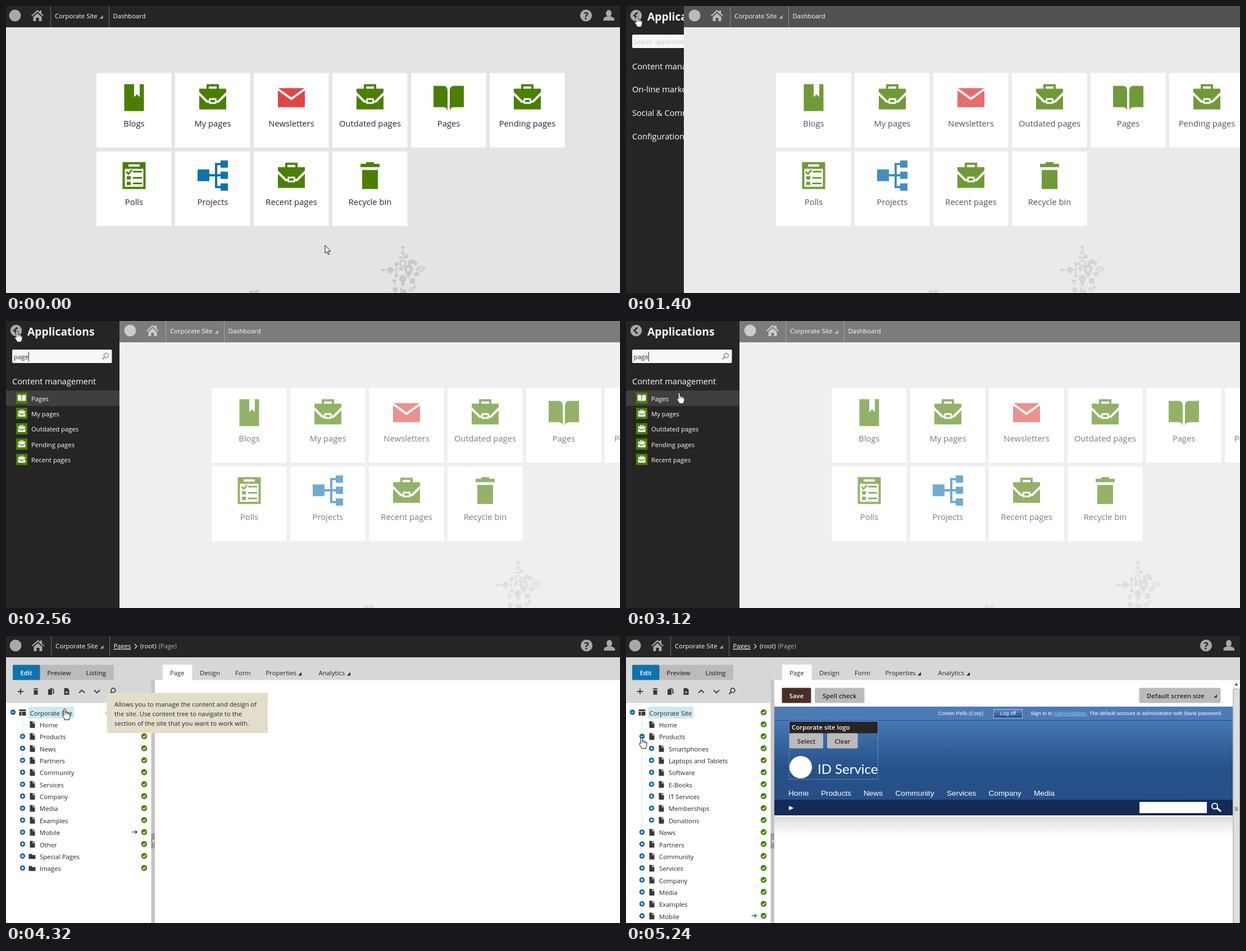
Recreate the animation shown at these times as an HTML page. Size 1093 px wide and 512 px high, loop 5960 ms.

```html
<!DOCTYPE html>
<html lang="en">
<head>
<meta charset="utf-8">
<title>Dashboard</title>
<style>
html, body { margin: 0; width: 100%; height: 100%; overflow: hidden; background: #fff; }
svg { display: block; width: 100vw; height: 100vh; }
text { font-family: "Open Sans", "Noto Sans", sans-serif; white-space: pre; }
.arial { font-family: "Liberation Sans", Arial, sans-serif; }
.lato { font-family: Lato, sans-serif; }
</style>
</head>
<body>
<svg id="stage" viewBox="0 0 1093 512" preserveAspectRatio="none"></svg>
<script>
const LOOP = 5960, STEP = 40, SHIFT = 205, EDGE = 3;
const DARK = '#262524', GREEN = '#4a7f04', BLUE = '#1072ae', RED = '#e14545', GREY = '#a9a9a9', BUTTON = '#bdbabb', INK = '#3a3939';
const ROW = 21.35, UI = 11.3;

// drawing helpers
const rect = (x, y, w, h, fill, extra = '') => `<rect x="${x}" y="${y}" width="${w}" height="${h}" fill="${fill}" ${extra}/>`;
const path = (d, fill, extra = '') => `<path d="${d}" fill="${fill}" ${extra}/>`;
const line = (d, color, width = 1, extra = '') => path(d, 'none', `stroke="${color}" stroke-width="${width}" ${extra}`);
const disc = (x, y, r, fill, extra = '') => `<circle cx="${x}" cy="${y}" r="${r}" fill="${fill}" ${extra}/>`;
const text = (x, y, s, size = UI, fill = DARK, extra = '') => `<text x="${x}" y="${y}" font-size="${size}" fill="${fill}" ${extra}>${s}</text>`;
const mid = 'text-anchor="middle"', bold = 'font-weight="600"';
const at = (x, y, body, scale = 1) => `<g transform="translate(${x} ${y}) scale(${scale})">${body}</g>`;
const group = (id, body, extra = '') => `<g id="${id}" ${extra}>${body}</g>`;
const corner = (x, y, fill, s = 6) => path(`M${x} ${y}h${-s}l${s} ${-s}z`, fill);
const lens = (x, y, r, color, w) => disc(x, y, r, 'none', `stroke="${color}" stroke-width="${w}"`) +
  line(`M${x - r * .7} ${y + r * .7}l${-r} ${r}`, color, w * 1.3);

// application icons, centred on 0,0
const icons = {
  briefcase: (c, bg) => rect(-24, -14, 48, 37, c) + line('M-9 -13V-20H9V-13', c, 4) +
    line('M-25 -6L-10 9H10L25 -6', bg, 4) + rect(-6.5, 3, 13, 10, bg) + rect(-4, 6, 8, 4, c),
  book: (c, bg) => rect(-17.5, -22, 35, 48, c) + path('M0 -22H10V1L5 -4L0 1z', bg),
  pages: c => [1, -1].map(s => `<g transform="scale(${s} 1)">` +
    path('M27 -19H8Q2 -18 2 -11V26Q3 19 9 19H27z', c) + '</g>').join(''),
  mail: (c, bg) => rect(-24, -15, 48, 34, c) + line('M-25 -14L0 4L25 -14', bg, 4),
  polls: (c, bg) => rect(-20.5, -23, 41, 48, c) + rect(-10, -19, 20, 4, bg) + rect(-16.5, -11, 33, 32, bg) +
    line('M-14 -6l4 4l6 -7', c, 3) + line('M-2 -6H14M-2 5H14M-2 15H14', c, 3) + rect(-13, 2, 7, 6, c) + rect(-13, 12, 7, 6, c),
  tree: c => rect(-27, -10, 21, 21, c) + [-26, -6, 15].map(y => rect(14, y, 13, 13, c)).join('') +
    line('M-6 .5H14M14 -19.5H6V21.5H14', c, 4),
  bin: c => rect(-17, -20, 34, 6, c) + rect(-7, -23, 14, 4, c) + rect(-14, -9, 28, 34, c),
};

const tiles = [
  ['Blogs', 'book'], ['My pages', 'briefcase'], ['Newsletters', 'mail', RED], ['Outdated pages', 'briefcase'],
  ['Pages', 'pages'], ['Pending pages', 'briefcase'], ['Polls', 'polls'], ['Projects', 'tree', BLUE],
  ['Recent pages', 'briefcase'], ['Recycle bin', 'bin'],
];

function clusterArt() {
  const c = '#c9c9c9', bg = '#e4e4e4';
  return line('M706.5 429V442M703 432l3.5 -4l3.5 4M703 439l3.5 4l3.5 -4', c, 2) +
    line('M669 471H696M695 460V483M699 449H712', c, 2) + path('M677 471l7 -7l7 7l-7 7z', c) + disc(670, 471, 2.5, c) +
    rect(692, 457, 6, 6, c) + rect(692, 479, 6, 5, c) + disc(712, 447, 3.5, c) + disc(703, 449, 2, c) +
    disc(706, 459, 5, 'none', `stroke="${c}" stroke-width="3"`) + disc(703, 469, 3.5, c) +
    disc(719, 458, 4, c) + disc(724, 456, 4, c) + disc(729, 459, 3.5, c) +
    path('M716.500 486L709 472A8 8 0 1 1 724 472z', c) + disc(716.5, 470, 3, bg) +
    path('M730 469Q738 458 747 469Q738 480 730 469z', c) + disc(738.5, 469, 4, bg) + disc(738.5, 469, 2, c) +
    path('M731 472l2 4h5l-4 3l1 5l-4 -3l-4 3l1 -5l-4 -3h5z', c) +
    disc(706.5, 486, 6.5, c) + rect(703.5, 491, 6, 8, c) + path('M686 488h11l-4 5v5l-3 -2v-3z', c) +
    path('M719 486h9v11l-2 -2h-7z', c) + disc(721, 506, 3, 'none', `stroke="${c}" stroke-width="2"`) +
    disc(727, 501.5, 2, 'none', `stroke="${c}" stroke-width="2"`) + disc(693, 506, 4.5, c) + rect(691, 509, 4, 4, c) +
    path('M702 513V502h3v5l4 -3v3l4 -3v9z', c) +
    disc(443, 521, 12, c) + disc(443, 521, 13, 'none', `stroke="${c}" stroke-width="5" stroke-dasharray="6 4.200"`);
}

function dashboard() {
  return rect(-10, 38, 1120, 474, '#e4e4e4') + clusterArt() + tiles.map(([name, icon, color = GREEN], i) => {
    const x = 161 + i % 6 * 140, y = 119.5 + (i > 5) * 140;
    return rect(x, y, 133.5, 133, '#fff') + at(x + 67, y + 42, icons[icon](color, '#fff')) +
      text(x + 67, y + 95.5, name, 14.75, DARK, mid);
  }).join('');
}

function header() {
  return rect(-10, 0, 1120, 38, DARK) + disc(16, 17, 10.5, GREY) +
    path('M45 17L56 7L60 10.600V8H63V13.400L67 17L65.500 18.500L56 10L46.500 18.500zM48.500 19.500L56 12.800L63.500 19.500V27H58.500V21H53.500V27H48.500z', GREY) +
    line('M79.500 0V37M183.500 0V37', '#6c6b6a') + text(87, 22, 'Corporate Site', UI, '#fff') + corner(172.5, 22.5, GREY) +
    group('crumbHome', text(190.5, 22, 'Dashboard', UI, '#fff')) +
    group('crumbPage', text(190.5, 22, 'Pages', UI, '#fff', 'text-decoration="underline"') +
      line('M228 14.500l4 4l-4 4', '#ddd', 1.3) + text(238, 22, '(root)', UI, '#fff') + text(270.5, 22, '(Page)', UI, '#b5b5b5')) +
    disc(1032.5, 17, 10.5, GREY) + text(1032.5, 23.5, '?', 18, DARK, mid + ' font-weight="700"') +
    `<ellipse cx="1073" cy="13" rx="5" ry="6" fill="${GREY}"/>` + path('M1063.500 26V23Q1064 20 1070 18.500H1076Q1082 20 1083 23V26z', GREY);
}

// content tree
const fileIcon = (x, y) => path(`M${x - 4} ${y - 6}h5v4h4v8h-9z`, INK) + path(`M${x + 2} ${y - 6}l3 3h-3z`, INK);
const folderIcon = (x, y) => path(`M${x - 6} ${y - 4}h5l1.500 2h5.500v7h-12z`, INK);
const toggle = (x, y, open) => disc(x, y, 4.7, '#0b619d') + line(`M${x - 2.5} ${y}h5` + (open ? '' : `M${x} ${y - 2.5}v5`), '#fff', 1.3);
const check = y => disc(245, y, 5.3, GREEN) + line(`M242.500 ${y}l2 2l3.500 -3.500`, '#fff', 1.4);
const products = ['Smartphones', 'Laptops and Tablets', 'Software', 'E-Books', 'IT Services', 'Memberships', 'Donations'];
const rest = ['News', 'Partners', 'Community', 'Services', 'Company', 'Media', 'Examples', 'Mobile', 'Other', 'Special Pages', 'Images'];

function treeRows(open) {
  const names = ['Home', 'Products', ...(open ? products : []), ...rest];
  const end = Math.min(512, 137 + names.length * ROW);
  return line(`M28.500 146V${end}` + (open ? `M45.500 188V${180 + 7 * ROW}` : ''), '#ccc', 1, 'stroke-dasharray="1 1"') +
    names.map((name, i) => {
      const y = 158.5 + i * ROW, x = open && products.includes(name) ? 17 : 0;
      const icon = /Special|Images/.test(name) ? folderIcon : fileIcon;
      return (name === 'Home' ? line(`M29 ${y - .5}H39`, '#ccc', 1, 'stroke-dasharray="1 1"') : toggle(28.5 + x, y - .8, open && name === 'Products')) +
        icon(45.5 + x, y - .5) + text(59 + x, y + 4.5, name) + check(y - 1) +
        (name === 'Mobile' ? line(`M223.500 ${y - 1}h8.500m-3 -3l3 3l-3 3`, INK, 1.4) : '');
    }).join('');
}

function treePane() {
  return rect(-10, 38, 268, 82, '#d5d8d6') + rect(-10, 119.5, 268, 393, '#fff') +
    rect(11, 51.5, 180, 27, BUTTON, 'rx="2"') + rect(11, 51.5, 48.5, 27, BLUE, 'rx="2"') +
    text(35, 70, 'Edit', UI, '#fff', mid + bold) + text(93.5, 70, 'Preview', UI, INK, mid + bold) + text(159.5, 70, 'Listing', UI, INK, mid + bold) +
    line('M25 94V104M20 99H30M129 101.500l5 -5l5 5M156 96.500l5 5l5 -5', INK, 1.8) +
    at(52, 98.5, icons.bin(INK), .25) + path('M74 95h7v10h-7zM77 93h5l2.500 2.500V103h-2V94.500h-5.500z', INK) +
    path('M102.500 93h6l3 3v9h-9z', INK) + line('M107 98v5M104.500 100.500h5', '#d5d8d6') + lens(190, 97, 3.8, INK, 1.7) +
    rect(39, 126, 81, 21, '#cfe8f0') + text(41.5, 141.5, 'Corporate Site') + toggle(11.5, 136, true) +
    path('M22.500 131h12v3h-12zM22.500 135h4v7h-4zM27.500 135h7v7h-7z', INK) + check(136) +
    group('closed', treeRows(false)) + group('opened', treeRows(true)) +
    rect(257.5, 38, 6.5, 474, '#c4c5c4') + rect(257.5, 352, 6.5, 27, '#9c9c9c') + path('M262.500 363v6l-3 -3z', '#fff');
}

const tabs = () => rect(257.5, 38, 850, 40.5, '#d5d8d6') + rect(278, 51, 52.5, 28, '#fff') +
  [[291, 'Page'], [344, 'Design'], [407, 'Form'], [461.5, 'Properties'], [555.5, 'Analytics']].map(([x, s]) => text(x, 70, s)).join('') +
  corner(525, 70.5, DARK) + corner(612, 70.5, DARK);

const button = (x, y, w, s, fill = BUTTON, ink = DARK) => rect(x, y, w, 27, fill, 'rx="2"') + text(x + w / 2, y + 18.5, s, UI, ink, mid + bold);

const toolbar = () => button(277.5, 92.5, 52, 'Save', '#492e28', '#fff') + button(336, 92.5, 88.5, 'Spell check') +
  rect(913.5, 92.5, 145, 27, BUTTON, 'rx="2"') + text(927, 111, 'Default screen size', UI, DARK, bold) + corner(1052, 110, INK);

function sitePage() {
  const small = (x, s, extra = '') => text(x, 141, s, 9.31, '#fff', 'class="arial" ' + extra);
  const nav = [[289, 'Home'], [347, 'Products'], [423, 'News'], [479.5, 'Community'], [571, 'Services'], [645.5, 'Company'], [726, 'Media']];
  return rect(264, 126, 816, 25, '#4d7bb6') + rect(264, 150.5, 816, 142, 'url(#sky)') + line('M264 150.500H1080', '#24497f') +
    small(556, 'Corwin Pells (Cory)') + rect(654.5, 130.5, 51, 16, 'url(#key)', 'stroke="#9dbce0"') + small(680, 'Log off', mid) +
    small(720, 'Sign in to <tspan fill="#8fd0ff" text-decoration="underline">Administration</tspan>. The default account is administrator with blank password.') +
    rect(290.5, 151.5, 158, 104, 'none', 'stroke="#8ba6cc" stroke-dasharray="3 2"') + rect(291, 153, 157, 20.5, DARK) +
    text(295, 167, 'Corporate site logo', UI, '#fff', bold) + button(291, 173.5, 60, 'Select') + button(358, 173.5, 54.5, 'Clear') +
    disc(311, 234, 20, '#fff') + text(341, 246, 'ID Service', 24, '#fff', 'class="lato"') +
    nav.map(([x, s]) => text(x, 285, s, 13.65, '#fff', 'class="arial"')).join('') +
    rect(264, 292, 816, 28, '#152b57') + path('M290 303v8l8.500 -4z', '#fff') + rect(914, 296, 120, 20, '#fff') +
    disc(1048, 303.5, 5, 'none', 'stroke="#fff" stroke-width="2"') + line('M1052 307l7 6', '#fff', 3) +
    rect(264, 322, 816, 34, 'url(#shade)') +
    rect(1080, 79, 13, 433, '#f0f0f0') + path('M1083.500 88l3 -4l3 4z', '#444') +
    rect(1081, 94.500, 11.5, 425, '#dedede', 'rx="2" stroke="#9b9b9b"') + line('M1083.500 306h6m-6 2.500h6m-6 2.500h6', '#555');
}

function appPanel() {
  const heads = ['Content management', 'On-line marketing', 'Social &amp; Community', 'Configuration'];
  const found = ['Pages', 'My pages', 'Outdated pages', 'Pending pages', 'Recent pages'];
  const head = (s, i) => text(11, 112.5 + i * 41.8, s, 14.6, '#fff');
  return rect(0, 0, 203, 512, DARK) + disc(18, 17, 10.3, GREY) + line('M20.500 11.500l-6 5.500l6 5.500', DARK, 2.6) +
    text(38, 26, 'Applications', 19.3, '#fff', 'font-weight="700"') + rect(11, 51, 177.5, 24, '#f6f8f6', 'rx="2"') +
    lens(178.5, 61.5, 4, '#8a8a8a', 1.5) + group('hint', text(14, 68, 'Search applications ...', 11, '#c6cac6')) +
    `<text id="query" x="14" y="68" font-size="${UI}" fill="${DARK}"></text>` + rect(14, 55, 1, 17, '#222', 'id="caret"') +
    head(heads[0], 0) + group('heads', heads.slice(1).map((s, i) => head(s, i + 1)).join('')) +
    group('found', rect(0, 124, 203, 27.5, '#403f3e') + found.map((s, i) => {
      const y = 127.5 + i * 27.35;
      return rect(18, y, 20, 20, GREEN) + at(28, y + 9.5, icons[i ? 'briefcase' : 'pages']('#fff', GREEN), .27) + text(45, y + 15.2, s, UI, '#fff');
    }).join(''));
}

const tooltip = () => path('M180 132v11l-5 -5.500z', '#e2dec9') + rect(179.5, 101.5, 286.5, 71.5, '#e2dec9') +
  ['Allows you to manage the content and design of', 'the site. Use content tree to navigate to the', 'section of the site that you want to work with.']
    .map((s, i) => text(193, 125.5 + i * 17, s)).join('');

const pointers = group('arrow', path('M0 0V14L3.200 11L5.600 16.500L7.800 15.500L5.500 10.300H9.800z', '#fff', 'stroke="#111"')) +
  group('hand', path('M-2 1.500Q-2 0 -.5 0Q1 0 1 1.500V6Q3.500 5 4 7Q6 6 6.700 8Q9 7.500 9 10V13Q9 16 7.500 17V19.500H-.5V18L-4.200 12.500Q-5 10 -3.500 10L-2 11.500z', '#fff', 'stroke="#111"') +
    line('M1 6V10M4 7V10.500M6.700 8V11', '#111', .8));

const gradient = (id, a, b, more = '') => `<linearGradient id="${id}" x2="0" y2="1"><stop stop-color="${a}"/>${more}<stop offset="1" stop-color="${b}"/></linearGradient>`;

document.getElementById('stage').innerHTML =
  '<defs>' + gradient('sky', '#4578b6', '#264f88', '<stop offset=".6" stop-color="#275189"/>') + gradient('key', '#5f93cf', '#1f4a86') +
  gradient('shade', '#dcdcdc', '#ffffff') + '<clipPath id="cut"><rect id="cutBox" height="512"/></clipPath></defs>' +
  group('desk', rect(-10, 0, 1120, 512, '#fff') + header() + group('dashboard', dashboard()) + group('tree', treePane()) +
    group('tabs', tabs()) + group('toolbar', toolbar()) + group('site', sitePage()) + rect(-10, 0, 1120, 512, '#fff', 'id="veil"')) +
  group('panel', appPanel(), 'clip-path="url(#cut)"') + group('tip', tooltip()) + group('pointer', pointers);

const el = {};
document.querySelectorAll('[id]').forEach(node => el[node.id] = node);
const show = (id, on) => el[id].style.display = on ? '' : 'none';
const span = (t, a, b) => Math.min(1, Math.max(0, (t - a) / (b - a)));
const swing = p => .5 - Math.cos(p * Math.PI) / 2;

// pointer moves: start, end, x, y
const moves = [[300, 1090, 20, 18], [2540, 3120, 95, 128], [4200, 4360, 107, 130], [4400, 4900, 28, 181]];
const keys = [1880, 1960, 2040, 2080];

function pointerAt(t) {
  let x = 568, y = 427;
  for (const [a, b, tx, ty] of moves) {
    const p = swing(span(t, a, b));
    x += (tx - x) * p;
    y += (ty - y) * p;
  }
  return [x, y];
}

function draw(t) {
  const open = swing(span(t, 1316, 1480)) - swing(span(t, 4120, 4329));
  const shift = Math.round(open * SHIFT);
  el.desk.setAttribute('transform', `translate(${shift} 0)`);
  el.veil.setAttribute('opacity', open * .4);
  el.cutBox.setAttribute('width', Math.max(0, shift - EDGE));

  const typed = 'page'.slice(0, keys.filter(k => t >= k).length);
  el.query.textContent = typed;
  el.caret.setAttribute('x', 14 + (typed ? el.query.getComputedTextLength() : 0));
  show('caret', t >= 1840);
  show('hint', !typed);
  show('heads', t < 2120);
  show('found', t >= 2120);

  show('dashboard', t < 3840);
  show('tree', t >= 3960);
  show('crumbHome', t < 4120);
  show('crumbPage', t >= 4120);
  show('tabs', t >= 4160);
  show('toolbar', t >= 4720);
  show('site', t >= 4840);
  show('closed', t < 5200);
  show('opened', t >= 5200);
  show('tip', t >= 3760 && t < 4480);
  el.tip.setAttribute('opacity', span(t, 3720, 3880));

  const [x, y] = pointerAt(t);
  const hand = t < 1300 ? y < 38 || (x > 161 && y > 120 && y < 393) : y < 30 || y > 96;
  show('hand', hand);
  show('arrow', !hand);
  el.pointer.setAttribute('transform', `translate(${Math.round(x)} ${Math.round(y)})`);
}

const start = performance.now();
function tick() {
  const t = (performance.now() - start) % LOOP;
  draw(Math.floor((t + 2) / STEP) * STEP);
  requestAnimationFrame(tick);
}
tick();
</script>
</body>
</html>
```
